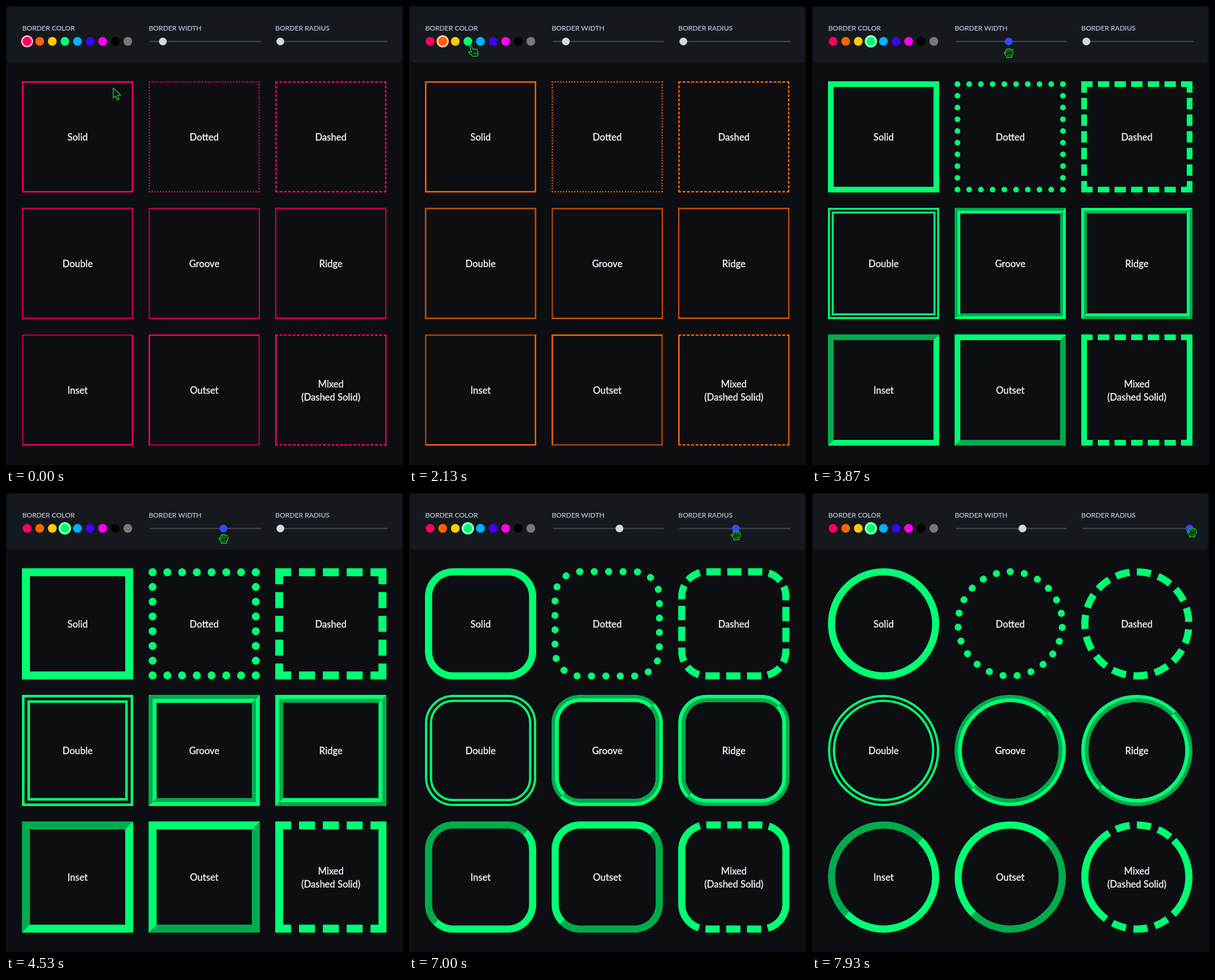
Animation, 696 px wide and 805 px high, one loop 8000 ms. Source, as an HTML page:

```html
<!DOCTYPE html>
<html lang="en">
<head>
<meta charset="utf-8">
<title>Border styles</title>
<style>
  html, body { margin: 0; width: 100%; height: 100%; overflow: hidden; background: #0c0e12; }
  #stage { position: relative; width: 696px; height: 805px; overflow: hidden; font-family: Lato, sans-serif; }
  svg { position: absolute; left: 0; top: 0; }
  .label { font-size: 12px; font-weight: 500; fill: #a9b6c3; stroke: #a9b6c3; stroke-width: .25px; }
  .box {
    position: absolute; box-sizing: border-box; width: 390px; height: 390px;
    transform: scale(.5); transform-origin: 0 0;
    display: flex; align-items: center; justify-content: center;
    border-color: var(--color); border-width: var(--width); border-radius: var(--radius);
    color: #e6e9ec; font-size: 33px; font-weight: 500; line-height: 46px;
    -webkit-text-stroke: .7px #e6e9ec;
    text-align: center; white-space: pre;
  }
</style>
</head>
<body>
<div id="stage">
  <svg id="panel" width="696" height="805">
    <rect x="1.5" y="2" width="693" height="97.5" rx="6" fill="#15191d"/>
  </svg>
  <svg id="pointer" width="696" height="805" style="z-index: 1">
    <g id="cursor" fill="#0a120c" stroke="#1fd022" stroke-width="1.4" stroke-linejoin="round" stroke-linecap="round">
      <path id="arrow" d="M0 0V17.5L4.3 13.8L7.2 20.6L10.3 19.2L7.4 12.6L13 12.2Z"/>
      <g id="hand">
        <path d="M-.4 .8C.4-.4 2-.2 2.5 1L5 7.2C6 6 6.5 6.2 7.6 7.4C8.6 6.2 9.8 6.6 10.4 7.8C11.4 6.8 12.6 7.4 13 8.8L14.2 13.4L13.2 18.6L5.6 19.4L-2.2 12.6C-2.6 10.8-.8 10.2.8 11.4L2.6 12.2Z"/>
        <path d="M6.6 12.4L7.2 16.4M9 12L9.6 16M11.4 11.8L11.8 15.4" fill="none" stroke-width="1"/>
      </g>
      <g id="fist">
        <path d="M-4.6 1V-5C-4.4-7-2.2-7-1.8-5.4C-1.4-8 .8-8 1.2-5.6C2-7.6 4-7.2 4.2-5C5.6-6.4 7.6-5.4 7.6-3.4V1.2L5.4 5V8H-3.8V5.6L-7.8 .6C-8-1.4-6.4-2-4.6 1Z"/>
        <path d="M-1.7-4.6V-.4M1.2-4.6V-.4M4.2-4.2V-.4M-1.4 2.6V5.4M1.2 2.6V5.4M3.6 2.6V5" fill="none" stroke-width="1.1"/>
      </g>
    </g>
  </svg>
</div>
<script>
const LOOP = 8000, STEP = 1000 / 15;
const COLORS = ['#ff0062', '#ff6400', '#ffcc00', '#00ff73', '#00b2ff', '#3d00ff', '#ff00f2', '#000', '#777'];
const BOXES = [
  ['Solid', 'solid'], ['Dotted', 'dotted'], ['Dashed', 'dashed'],
  ['Double', 'double'], ['Groove', 'groove'], ['Ridge', 'ridge'],
  ['Inset', 'inset'], ['Outset', 'outset'], ['Mixed\n(Dashed Solid)', 'dashed solid']
];
// time, x, y of the pointer's hot spot
const PATH = [
  [0, 188, 144], [650, 62, 68], [1150, 60, 67], [1800, 98, 69], [2130, 107, 69],
  [2500, 108, 70], [2930, 241, 83], [3300, 275, 74], [3470, 275, 76], [3870, 345, 82],
  [4350, 385, 81], [5000, 369, 77], [5230, 369, 72], [5670, 521, 62], [6130, 481, 67],
  [6300, 481, 70], [7000, 573, 74], [7930, 666, 69]
];
const SHAPES = [[0, 'arrow'], [540, 'hand'], [2600, 'arrow'], [3200, 'hand'], [3400, 'fist'],
  [5230, 'hand'], [5330, 'arrow'], [5450, 'hand'], [6230, 'fist']];
const PICKS = [[0, 0], [870, 1], [2330, 3]];
const FOCUS = [[0, ''], [3400, 'width'], [6230, 'radius']];
const MIN_X = { width: 275, radius: 481 }, MAX_RADIUS_X = 662;

const $ = id => document.getElementById(id);
const stage = $('stage'), panel = $('panel');

function add(tag, attrs, text = '') {
  const el = document.createElementNS('http://www.w3.org/2000/svg', tag);
  for (const key in attrs) el.setAttribute(key, attrs[key]);
  el.textContent = text;
  return panel.appendChild(el);
}

['BORDER COLOR', 'BORDER WIDTH', 'BORDER RADIUS'].forEach((text, i) =>
  add('text', { x: 28.5 + 221.8 * i, y: 43, class: 'label' }, text));

const swatchX = i => 37 + 22.07 * i;
COLORS.forEach((fill, i) => add('circle', { cx: swatchX(i), cy: 62, r: 7.7, fill }));
const halo = add('circle', { cy: 62, r: 11 });
const ring = add('circle', { cy: 62, r: 9.1, stroke: '#fff', 'stroke-width': 1.8 });

function slider(left) {
  add('rect', { x: left, y: 61, width: 195, height: 2.4, rx: 1, fill: '#3b4046' });
  return add('circle', { cy: 62.3, r: 6.8 });
}
const thumbs = { width: slider(252), radius: slider(474) };

BOXES.forEach(([text, style], i) => {
  const box = document.createElement('div');
  box.className = 'box';
  box.textContent = text;
  box.style.borderStyle = style;
  box.style.left = 28.4 + 221.9 * (i % 3) + 'px';
  box.style.top = 132 + 222 * Math.floor(i / 3) + 'px';
  stage.append(box);
});

const latest = (table, t) => table.filter(row => row[0] <= t).pop()[1];

function pointerAt(t) {
  const i = PATH.findIndex(key => key[0] > t);
  if (i < 0) return PATH[PATH.length - 1].slice(1);
  const [t0, x0, y0] = PATH[i - 1], [t1, x1, y1] = PATH[i];
  const p = (t - t0) / (t1 - t0);
  const e = p * p * (3 - 2 * p) * .5 + p * .5;
  return [x0 + (x1 - x0) * e, y0 + (y1 - y0) * e];
}

// A dragged thumb follows the pointer and keeps its place after release.
function thumbAt(name, t) {
  const [from, to] = name === 'width' ? [3470, 5230] : [6300, LOOP];
  return t < from ? MIN_X[name] : pointerAt(Math.min(t, to))[0];
}

function draw(t) {
  const [x, y] = pointerAt(t), shape = latest(SHAPES, t);
  $('cursor').setAttribute('transform', `translate(${x} ${y})`);
  for (const id of ['arrow', 'hand', 'fist']) $(id).style.display = id === shape ? '' : 'none';

  const pick = latest(PICKS, t), color = COLORS[pick];
  for (const el of [halo, ring]) {
    el.setAttribute('cx', swatchX(pick));
    el.setAttribute('fill', color);
  }

  const widthX = thumbAt('width', t), radiusX = Math.min(thumbAt('radius', t), MAX_RADIUS_X);
  thumbs.width.setAttribute('cx', widthX);
  thumbs.radius.setAttribute('cx', radiusX);
  const focus = latest(FOCUS, t);
  for (const name in thumbs) thumbs[name].setAttribute('fill', name === focus ? '#2f4bf5' : '#d2dae0');

  const width = Math.round(5 + (widthX - MIN_X.width) * 20 / 94);
  const radius = 50 * (radiusX - MIN_X.radius) / (MAX_RADIUS_X - MIN_X.radius);
  stage.style.setProperty('--color', color);
  stage.style.setProperty('--width', width + 'px');
  stage.style.setProperty('--radius', radius + '%');
}

const start = performance.now();
function tick() {
  const t = (performance.now() - start) % LOOP;
  draw(Math.floor((t + 4) / STEP) * STEP % LOOP);
  requestAnimationFrame(tick);
}
tick();
</script>
</body>
</html>
```
